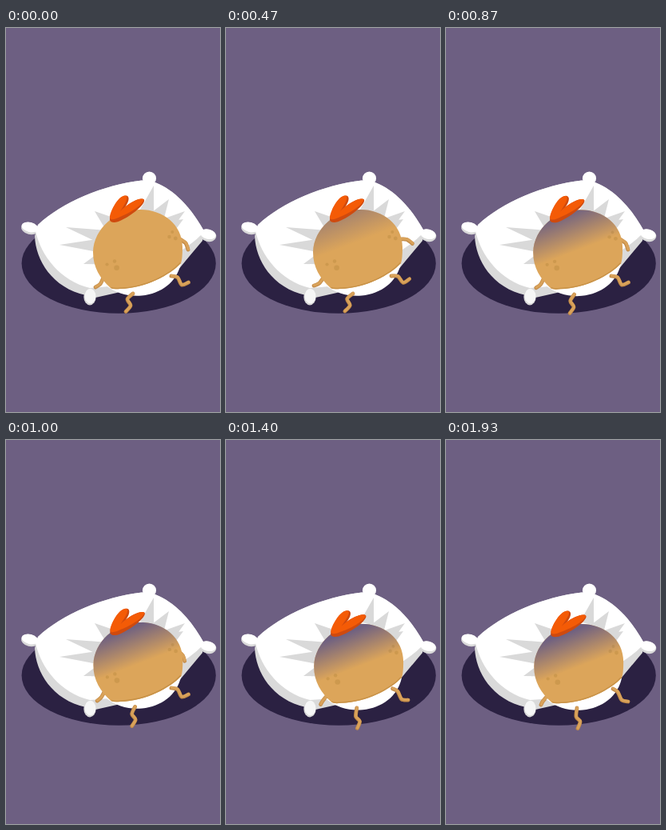
An HTML page that plays this animation: 268 px wide and 480 px high, repeating every 2.39 s.

```html
<!DOCTYPE html>
<html lang="en">
<head>
<meta charset="utf-8">
<title>Sleepy chick</title>
<style>
  html, body { margin: 0; width: 100%; height: 100%; overflow: hidden; background: #6d5f82; }
  svg { display: block; width: 100%; height: 100%; }
  .limb { fill: none; stroke-linecap: round; stroke-linejoin: round; }
  .edge { stroke: #c28b49; stroke-width: 4.8; }
  .tone { stroke: #d9a25a; stroke-width: 3.2; }
</style>
</head>
<body>
<svg viewBox="0 0 268 480">
  <defs>
    <linearGradient id="shade" gradientUnits="userSpaceOnUse">
      <stop offset="0" stop-color="#6e6081"/>
      <stop offset="1" stop-color="#6e6081" stop-opacity="0"/>
    </linearGradient>
    <path id="egg" d="M131 325C118 313 109 300 109 280C110 250 138 227 168 227C197 227 221 246 221 274Q221 289 219 294C205 309 175 325 143 326Q134 327 131 325Z"/>
    <clipPath id="eggClip"><use href="#egg"/></clipPath>
  </defs>
  <rect width="268" height="480" fill="#6d5f82"/>
  <ellipse cx="141.2" cy="294.3" rx="121.6" ry="62.5" fill="#2b2142"/>

  <!-- pillow -->
  <g fill="#dadada">
    <path d="M40 246C70 218 122 196 170 190.5L184 192C205 199 228 218 247 252L246 266Q234 280 215 303Q165 327 112 337L100 334C58 325 37 290 36 260Z"/>
    <ellipse cx="30" cy="250.6" rx="11" ry="7.5" transform="rotate(14 30 250)"/>
    <ellipse cx="253" cy="259.4" rx="10.5" ry="7.6" transform="rotate(12 253 259)"/>
  </g>
  <g fill="#fff">
    <path d="M40 246C70 218 122 196 170 190.5L184 192C205 199 228 218 247 252L244 259Q235 268 221 277L197 305Q160 322 105 325C68 316 44 285 37 254Z"/>
    <ellipse cx="30" cy="249" rx="10.6" ry="6.1" transform="rotate(14 30 249)"/>
    <ellipse cx="253" cy="257.7" rx="10" ry="6.1" transform="rotate(12 253 258)"/>
    <circle cx="179.5" cy="188" r="8.6"/>
    <ellipse cx="105" cy="336" rx="7.7" ry="10.4" fill="#dadada"/>
    <ellipse cx="105.5" cy="335" rx="6.9" ry="9.3" fill="#f6f6f6"/>
  </g>
  <path id="creases" fill="#d9d9d9"/>

  <g id="arms"></g>
  <g id="body">
    <path fill="#fff" d="M124 321C138 332 154 336 170 334.5C194 332 214 318 219 294Z"/>
    <use href="#egg" fill="#dca55a"/>
    <g fill="#cd994e">
      <circle cx="126.5" cy="295.5" r="2.1"/>
      <circle cx="136" cy="291.5" r="2.2"/>
      <circle cx="138.6" cy="299.7" r="3.3"/>
      <circle cx="204.5" cy="261" r="2.2"/>
      <circle cx="208.3" cy="255" r="1.9"/>
      <circle cx="212.3" cy="263" r="2.4"/>
    </g>
    <g clip-path="url(#eggClip)">
      <path d="M219 294C205 309 175 325 143 326Q134 327 131 325" fill="none" stroke="#c99348" stroke-width="3"/>
      <rect id="tint" x="100" y="220" width="130" height="115" fill="url(#shade)"/>
    </g>
    <g id="comb">
      <path fill="#cf4a0e" d="M130 240C130 230 141 208 151 209.5C156 211 153 219 149 224C156 217 170 211 173 214.5C175 220 158 234 145 240C138 244 131 244 130 240Z"/>
      <path fill="#f45b06" d="M130 237C130 230 141 208 150 209.7C154 211 149 220 143 229C153 219 169 210.5 172.5 214.5C172 220 158 230 143 236C137 239 131 241 130 237Z"/>
    </g>
  </g>
  <g id="legs"></g>
</svg>
<script>
const LOOP = 2390, STEP = 200 / 3, LAST = 29;
const $ = id => document.getElementById(id);
const mix = (a, b, u) => a + (b - a) * u;

function ease(t, from, to) {
  const u = Math.max(0, Math.min(1, (t - from) / (to - from)));
  return u * u * (3 - 2 * u);
}

// Pillow creases: narrow triangles pointing away from the body
const CENTER = [165, 273];
const tips = [[97, 295], [67, 271], [75, 249], [111, 229], [185, 197], [204, 214], [224, 229], [222, 239]];
$("creases").setAttribute("d", tips.map(([x, y]) => {
  const [cx, cy] = CENTER, reach = Math.hypot(x - cx, y - cy);
  const ux = (x - cx) / reach, uy = (y - cy) / reach;
  const corner = side => [cx + 45 * ux - 9 * side * uy, cy + 45 * uy + 9 * side * ux];
  return `M${x} ${y}L${corner(1)}L${corner(-1)}Z`;
}).join(""));

function smoothPath(pts) {
  const at = i => pts[Math.max(0, Math.min(pts.length - 1, i))];
  let d = `M${pts[0]}`;
  for (let i = 0; i < pts.length - 1; i++) {
    const [p, a, b, n] = [at(i - 1), at(i), at(i + 1), at(i + 2)];
    const c1 = a.map((v, j) => v + (b[j] - p[j]) / 7);
    const c2 = b.map((v, j) => v - (n[j] - a[j]) / 7);
    d += `C${c1} ${c2} ${b}`;
  }
  return d;
}

// A limb swings around its first joint, then relaxes from one pose to the other
const limbs = [
  { parent: "arms", swing: 10, relax: [700, 1530],
    awake: [[122, 312], [118, 320], [112, 324]],
    asleep: [[126, 321], [121, 327], [119, 331]] },
  { parent: "arms", swing: -33, relax: [850, 1200],
    awake: [[218, 264], [225, 269], [228, 277]],
    asleep: [[214, 265], [216, 270], [217, 275]] },
  { parent: "legs", swing: 3, relax: [450, 1530],
    awake: [[159, 332], [152, 339], [156, 347], [150, 354.5]],
    asleep: [[164, 335], [163, 346], [168, 352], [165, 360.5]] },
  { parent: "legs", swing: -11, relax: [1100, 1530],
    awake: [[207, 310], [215, 312], [220, 321], [228.5, 318]],
    asleep: [[209, 311], [215, 315], [220, 325], [228, 327]] }
];

for (const limb of limbs) {
  limb.lines = ["edge", "tone"].map(name => {
    const line = document.createElementNS("http://www.w3.org/2000/svg", "path");
    line.setAttribute("class", "limb " + name);
    $(limb.parent).append(line);
    return line;
  });
  limb.lines[1].setAttribute("transform", "translate(.3 -.5)");
}

function drawLimb({ awake, asleep, swing, relax, lines }, t) {
  const u = ease(t, ...relax);
  const effort = Math.sqrt(Math.max(0, Math.sin(Math.PI * Math.min(1, t / 870))));
  const pts = awake.map((p, i) => p.map((v, j) => mix(v, asleep[i][j], u)));
  for (const line of lines) line.setAttribute("d", smoothPath(pts));
  $turn(lines, swing * effort, pts[0]);
}

function $turn(lines, angle, [x, y]) {
  lines.forEach((line, i) =>
    line.setAttribute("transform", `translate(${i * .3} ${i * -.5}) rotate(${angle} ${x} ${y})`));
}

function draw(t) {
  for (const limb of limbs) drawLimb(limb, t);

  const settle = ease(t, 700, 1530);
  $("body").setAttribute("transform", `translate(${1.2 * settle} ${3 * settle})`);
  $("comb").setAttribute("transform", `rotate(${3 * settle} 130 240)`);

  const shade = Math.sin(Math.PI / 2 * Math.min(1, t / 1200));
  const end = mix(250, 281, shade);
  $("tint").setAttribute("opacity", shade);
  const axis = { x1: 147, y1: end - 42, x2: 163, y2: end };
  for (const name in axis) $("shade").setAttribute(name, axis[name]);
}

// Poses are held at fifteen per second, with times rounded to 10 ms, then rest
const poseStart = k => Math.round(k * STEP / 10) * 10;

function heldTime(t) {
  let k = Math.min(LAST, Math.floor(t / STEP) + 1);
  while (poseStart(k) > t) k--;
  return poseStart(k);
}

function tick() {
  draw(heldTime(performance.now() % LOOP));
  requestAnimationFrame(tick);
}
tick();
</script>
</body>
</html>
```
